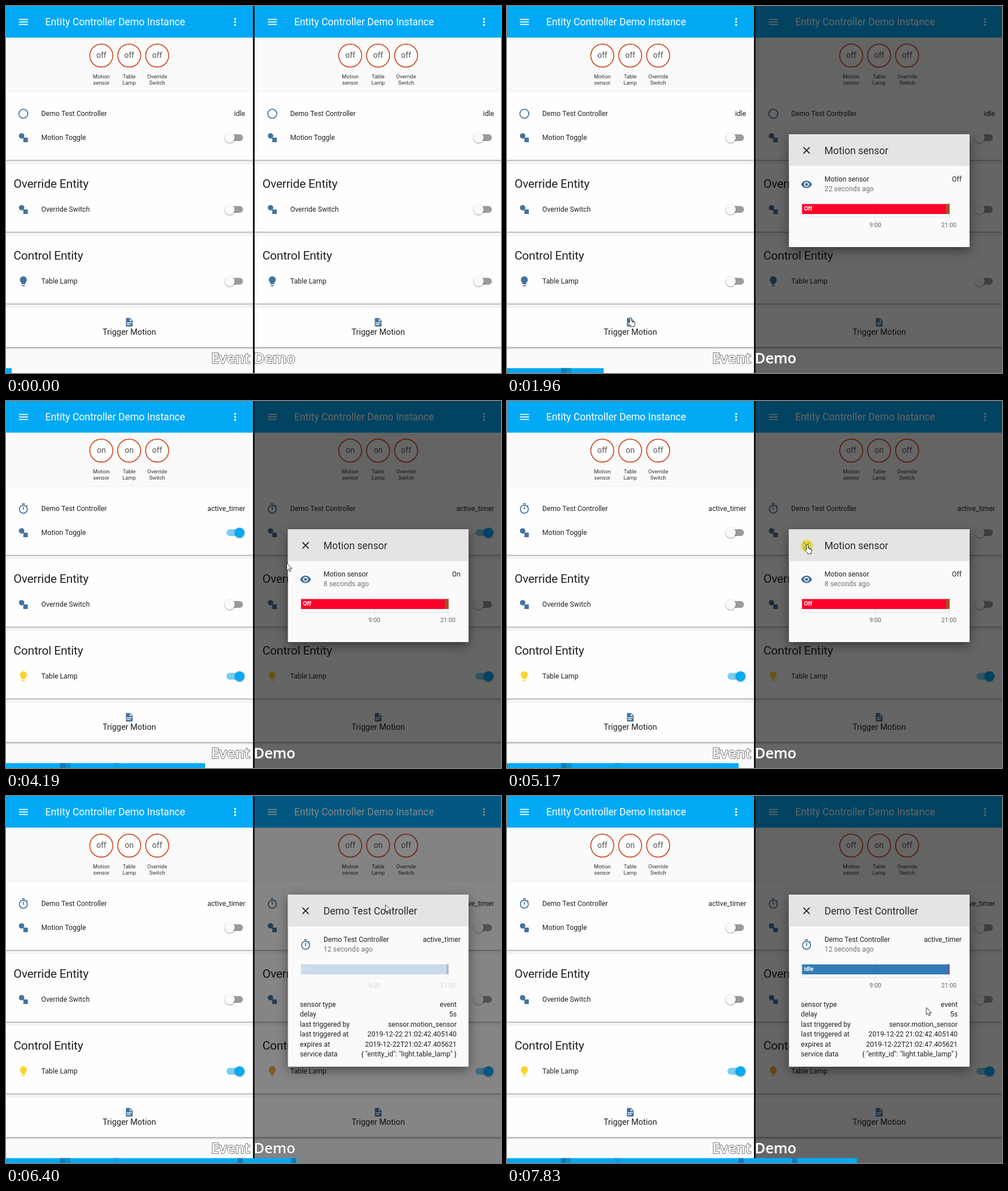
An HTML page with a canvas for the animation above (8 s loop, 870x644 px).

```html
<!DOCTYPE html>
<html lang="en">
<head>
<meta charset="utf-8">
<title>Entity Controller Demo</title>
<style>
html, body { margin: 0; width: 100%; height: 100%; overflow: hidden; }
canvas { display: block; }
</style>
</head>
<body>
<canvas id="stage" width="870" height="644"></canvas>
<script>
const ctx = document.getElementById('stage').getContext('2d');
const LOOP = 8000;
const BLUE = '#03a9f4', ICON = '#44739e', INK = '#212121';
const RIGHT = 437.5;

// The screen updates in bursts: [first ms, last ms, updates].
const BURSTS = [
  [200, 990, 8], [1090, 1860, 8], [1960, 2080, 2], [2300, 3090, 8], [3200, 3970, 8],
  [4070, 4740, 7], [5170, 5950, 8], [6070, 6840, 8], [6940, 7380, 5], [7710, 7830, 2]
];
const TICKS = BURSTS.flatMap(([from, to, count]) =>
  Array.from({ length: count }, (_, i) => from + (to - from) * i / (count - 1)));

// Keys are [tick, value...].
const CURSOR = [
  [1, 738, 9], [7, 603, 85], [12, 603, 85], [16, 224, 531], [18, 210.5, 562.5], [26, 210.5, 562.5],
  [34, 459, 317], [38, 528, 252], [44, 528, 252], [49, 650, 189], [53, 667, 191],
  [57, 688, 257], [62, 731, 368], [64, 737, 371]
];
const DIM = [[8, 0], [10, .4], [12, .6], [42, .6], [43, .25], [44, .03], [45, 0], [51, 0], [53, .48], [55, .6]];
const SENSOR_DIALOG = [[8, 0], [10, 1], [42, 1], [43, .35], [44, 0]];
const SENSOR_CHART = [[10, .06], [13, 1]];
const TIMER_DIALOG = [[51, 0], [53, 1]];
const TIMER_CHART = [[53, .25], [56, 1]];
const MOTION = [[20, 0], [22, 1], [37, 1], [39, 0]];
const LAMP = [[20, 0], [22, 1]];
const HAND_SPANS = [[7, 9], [17, 27], [37, 45], [48, 52]];
const CLICKS = [[8, 8], [19, 20], [42, 42], [51, 51]];

const paths = {
  shapes: 'M8.5,3A5.5,5.5 0 0,1 14,8.5C14,9.83 13.53,11.05 12.74,12H21V21H12V12.74C11.05,13.53 9.83,14 8.5,14A5.5,5.5 0 0,1 8.5,3Z',
  circle: 'M12,2A10,10 0 0,0 12,22A10,10 0 0,0 12,2M12,4A8,8 0 0,1 12,20A8,8 0 0,1 12,4Z',
  bulb: 'M12,2A7,7 0 0,0 5,9C5,11.38 6.19,13.47 8,14.74V17A1,1 0 0,0 9,18H15A1,1 0 0,0 16,17V14.74C17.81,13.47 19,11.38 19,9A7,7 0 0,0 12,2M9,21A1,1 0 0,0 10,22H14A1,1 0 0,0 15,21V20H9Z',
  timer: 'M12,20A7,7 0 0,1 12,6A7,7 0 0,1 12,20M12,4A9,9 0 1,0 21,13C21,10.88 20.26,8.93 19.03,7.39L20.45,5.97L19.04,4.56L17.62,6C16.07,4.74 14.12,4 12,4M11,14H13V8H11ZM15,1H9V3H15Z',
  file: 'M13,9H18.5L13,3.5ZM6,2H14L20,8V20A2,2 0 0,1 18,22H6A2,2 0 0,1 4,20V4A2,2 0 0,1 6,2M15,18V16H6V18ZM18,14V12H6V14Z',
  eye: 'M12,9A3,3 0 0,0 12,15A3,3 0 0,0 12,9M12,17A5,5 0 0,1 12,7A5,5 0 0,1 12,17M12,4.5C7,4.5 2.73,7.61 1,12C2.73,16.39 7,19.5 12,19.5C17,19.5 21.27,16.39 23,12C21.27,7.61 17,4.5 12,4.5Z',
  arrow: 'M0,0V13L3,10.2L5,14.8L7,13.9L5.1,9.5H9.2Z',
  hand: 'M-1.5,9V1.2A1.5,1.5 0 0,1 1.5,1.2V6L6.5,7.2Q8,7.8 7.8,9.5L6.8,14V16H0V14.5L-4,10Q-4.8,8.6 -3.4,8.2Q-2.4,8.2 -1.5,9ZM3.4,6.6V9M5.6,7.1V9.2'
};
for (const key in paths) paths[key] = new Path2D(paths[key]);

const smooth = p => p * p * (3 - 2 * p);
const within = (n, spans) => spans.some(([a, b]) => n >= a && n <= b);

function track(keys, n, ease = p => p) {
  if (n <= keys[0][0]) return keys[0].slice(1);
  for (let i = 1; i < keys.length; i++) {
    const a = keys[i - 1], b = keys[i];
    if (n <= b[0]) {
      const p = ease((n - a[0]) / (b[0] - a[0]));
      return a.slice(1).map((v, j) => v + (b[j + 1] - v) * p);
    }
  }
  return keys[keys.length - 1].slice(1);
}
const level = (keys, n) => track(keys, n)[0];

function rect(x, y, w, h, color) {
  ctx.fillStyle = color;
  ctx.fillRect(x, y, w, h);
}

function disc(x, y, r, color) {
  ctx.fillStyle = color;
  ctx.beginPath();
  ctx.arc(x, y, r, 0, Math.PI * 2);
  ctx.fill();
}

function text(str, x, y, size, color = INK, align = 'left', weight = 400) {
  ctx.font = `${weight} ${size}px Roboto, sans-serif`;
  ctx.textAlign = align;
  ctx.fillStyle = color;
  ctx.fillText(str, x, y);
}

function headline(str, y) {
  ctx.letterSpacing = '-0.25px';
  text(str, 13.2, y, 21);
  ctx.letterSpacing = '0px';
}

function icon(name, x, y, color = ICON, scale = .875) {
  ctx.save();
  ctx.translate(x - 12 * scale, y - 12 * scale);
  ctx.scale(scale, scale);
  ctx.fillStyle = color;
  ctx.fill(paths[name], 'evenodd');
  ctx.restore();
}

function shadowed(color, blur, dy, draw) {
  ctx.save();
  ctx.shadowColor = color;
  ctx.shadowBlur = blur;
  ctx.shadowOffsetY = dy;
  draw();
  ctx.restore();
}

function card(y, bottom) {
  const fill = () => rect(-4, y, 442, bottom - y, '#fefefe');
  shadowed('rgba(0,0,0,.2)', 4, 1, fill);
  shadowed('rgba(0,0,0,.3)', 2, 1, fill);
}

function toggle(y, on) {
  ctx.fillStyle = on > .5 ? '#77cdf3' : '#9b9b9b';
  ctx.beginPath();
  ctx.roundRect(387.5, y - 6.1, 29, 12.2, 6.1);
  ctx.fill();
  shadowed('rgba(0,0,0,.4)', 3, 1, () =>
    disc(393.3 + 17.2 * on, y, 8.7, on > .5 ? BLUE : '#fafafa'));
}

function row(name, y, label, color) {
  icon(name, 30.5, y, color);
  text(label, 62, y + 4.3, 12.25);
}

function badge(x, state, lines) {
  disc(x, 87, 20.2, '#fff');
  ctx.strokeStyle = '#cf4f26';
  ctx.lineWidth = 1.75;
  ctx.stroke();
  text(state, x, 91.3, 14, '#555', 'center');
  lines.split(' ').forEach((s, i) => text(s, x, 127 + 11 * i, 9.4, '#333', 'center'));
}

function panel(left, n, lampColor) {
  const motion = level(MOTION, n), lamp = level(LAMP, n);
  const name = v => v > 0 ? 'on' : 'off';
  const sensorOn = n >= 21 && n < 38;
  ctx.save();
  ctx.beginPath();
  ctx.rect(Math.floor(left), 0, 434, 644);
  ctx.clip();
  ctx.translate(left, 0);
  rect(-1, 0, 436, 644, '#fafafa');
  rect(-1, 0, 436, 55.5, BLUE);
  for (let i = -1; i <= 1; i++) {
    rect(22.7, 27.1 + i * 4.4, 15.8, 1.75, '#fff');
    disc(402.7, 28 + i * 5.3, 1.8, '#fff');
  }
  text('Entity Controller Demo Instance', 69, 34.2, 17.5, '#fff');

  badge(167.5, sensorOn ? 'on' : 'off', 'Motion sensor');
  badge(216.5, name(lamp), 'Table Lamp');
  badge(265.7, 'off', 'Override Switch');

  card(150.5, 270);
  card(277, 396);
  card(403, 522);
  card(529, 598.5);
  row(lamp ? 'timer' : 'circle', 189, 'Demo Test Controller');
  text(lamp ? 'active_timer' : 'idle', 420.3, 193.2, 12.25, INK, 'right');
  row('shapes', 231, 'Motion Toggle');
  toggle(231, motion);
  headline('Override Entity', 318.5);
  row('shapes', 357, 'Override Switch');
  toggle(357, 0);
  headline('Control Entity', 444.5);
  row('bulb', 483, 'Table Lamp', lamp ? lampColor : ICON);
  toggle(483, lamp);
  icon('file', 216.7, 555, ICON, .74);
  text('Trigger Motion', 216.7, 577.3, 14.4, INK, 'center');
  ctx.restore();
}

function dialog(d) {
  if (!d.alpha) return;
  const { top, bottom } = d;
  ctx.save();
  ctx.globalAlpha = d.alpha;
  shadowed('rgba(0,0,0,.45)', 18, 6, () => rect(495.5, top, 317.5, bottom - top, '#fafafa'));
  rect(495.5, top, 317.5, 56, '#e4e4e4');
  ctx.strokeStyle = INK;
  ctx.lineWidth = 1.8;
  ctx.beginPath();
  for (const s of [-1, 1]) {
    ctx.moveTo(526.5 - 5.5, top + 28.3 - 5.5 * s);
    ctx.lineTo(526.5 + 5.5, top + 28.3 + 5.5 * s);
  }
  ctx.stroke();
  text(d.title, 558, top + 34.5, 17.5, '#2b2b2b');
  icon(d.icon, 526.5, top + 88);
  text(d.title, 558, top + 82.8, 12.25);
  text(d.age, 558, top + 100.4, 12.25, '#727272');
  text(d.state, 799, top + 82.8, 12.25, INK, 'right');
  (d.attributes || []).forEach(([key, value], i) => {
    const y = top + 196.9 + 17.4 * i;
    text(key, 516.5, y, 12.25);
    text(value, 792, y, 12.25, INK, 'right');
  });

  ctx.globalAlpha *= d.chart;
  rect(518, top + 145, 260, 1, '#e2e2e2');
  rect(647, top + 119, 1, 34, '#e0e0e0');
  rect(776.5, top + 119, 1, 34, '#e0e0e0');
  rect(518.5, top + 122.5, 259.5, 17.5, d.color);
  rect(778 - d.tailWidth, top + 122.5, d.tailWidth, 17.5, d.tail);
  text(d.past, 522, top + 134, 10.3, '#fff', 'left', 700);
  text('9:00', 647.5, top + 163, 10.8, '#666', 'center');
  text('21:00', 776.7, top + 163, 10.8, '#666', 'center');
  ctx.restore();
}

function pointer(n) {
  if (n < 1) return;
  const [x, y] = track(CURSOR, n, smooth);
  if (within(n, CLICKS)) disc(x - 1, y + 2, 10.5, 'rgba(222,214,30,.75)');
  const shape = within(n, HAND_SPANS) ? paths.hand : paths.arrow;
  ctx.save();
  ctx.translate(x, y);
  ctx.fillStyle = '#fff';
  ctx.strokeStyle = '#333';
  ctx.lineWidth = 1;
  ctx.lineJoin = 'round';
  ctx.fill(shape);
  ctx.stroke(shape);
  ctx.restore();
}

function caption() {
  ctx.font = '600 25.4px "Open Sans", sans-serif';
  ctx.textAlign = 'center';
  ctx.lineJoin = 'round';
  ctx.lineWidth = 2;
  ctx.strokeStyle = '#777';
  ctx.strokeText('Event Demo', 434.5, 627);
  ctx.fillStyle = '#fff';
  ctx.fillText('Event Demo', 434.5, 627);
}

function progress(n) {
  const end = Math.floor(10 + 9.455 * n);
  rect(0, 635.5, end, 8.5, BLUE);
  const marks = [[95, 9, '#0a7bb1'], [104, 9, '#068fcf'], [189, 10, '#0a9fe4'], [407, 9, '#0a7bb1'], [501, 9, '#0a7bb1']];
  for (const [x, w, color] of marks) if (end >= x + w) rect(x, 635.5, w, 8.5, color);
}

function render(ms) {
  const n = TICKS.filter(t => t <= ms + 12).length;
  panel(0, n, '#fdd42e');
  panel(RIGHT, n, n < 43 ? '#fdd42e' : '#f3ab42');
  rect(437, 0, 433, 644, `rgba(0,0,0,${level(DIM, n)})`);
  rect(434, 0, 3, 644, '#111');

  const triggered = n >= 21;
  dialog({
    alpha: level(SENSOR_DIALOG, n), chart: level(SENSOR_CHART, n),
    top: 225, bottom: n < 12 ? 421.5 : 423,
    title: 'Motion sensor', icon: 'eye', age: triggered ? '8 seconds ago' : '22 seconds ago',
    state: triggered && n < 38 ? 'On' : 'Off',
    past: 'Off', color: '#ff0029', tail: '#a8502c', tailWidth: 6.5
  });
  dialog({
    alpha: level(TIMER_DIALOG, n), chart: level(TIMER_CHART, n),
    top: 173, bottom: 475,
    title: 'Demo Test Controller', icon: 'timer', age: '12 seconds ago', state: 'active_timer',
    past: 'idle', color: '#317ab5', tail: '#6a589f', tailWidth: 4,
    attributes: [
      ['sensor type', 'event'],
      ['delay', '5s'],
      ['last triggered by', 'sensor.motion_sensor'],
      ['last triggered at', '2019-12-22 21:02:42.405140'],
      ['expires at', '2019-12-22T21:02:47.405621'],
      ['service data', '{ "entity_id": "light.table_lamp" }']
    ]
  });
  pointer(n);
  caption();
  progress(n);
}

let start;
function loop(now) {
  start ??= now;
  render((now - start) % LOOP);
  requestAnimationFrame(loop);
}
requestAnimationFrame(loop);
</script>
</body>
</html>
```
